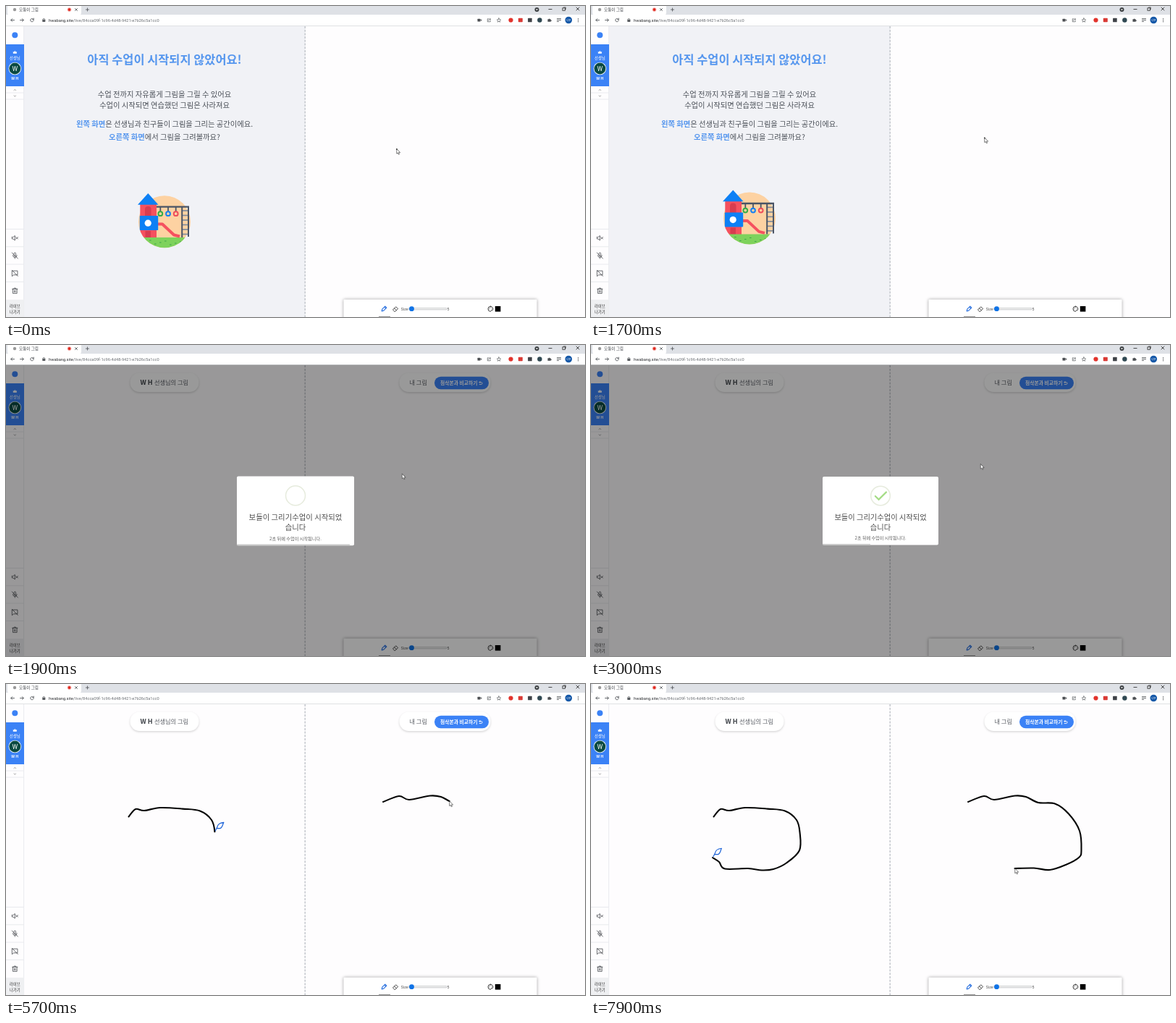
Animation of 800x430 px, one loop 8000 ms. Source, as an HTML page with a canvas:

```html
<!DOCTYPE html>
<html lang="ko">
<head>
<meta charset="utf-8">
<title>모퉁이 그림</title>
<style>
html, body { margin: 0; width: 100%; height: 100%; overflow: hidden; background: #fff; }
canvas { display: block; width: 800px; height: 430px; }
</style>
</head>
<body>
<canvas id="stage"></canvas>
<script>
const W = 800, H = 430, LOOP = 8000, STEP = 100;
const KR = '"Noto Sans CJK KR", "Noto Sans KR", sans-serif';
const LATIN = 'Roboto, sans-serif';
const BLUE = '#3b82f6', SKY = '#5596ee', INK = '#4b5058', LINE = '#e4e6ea';
const RED = '#f5515f', STEEL = '#4a5566', GREY = '#5a5d61';
const TEACHER = 'W H', LESSON = '보들이';
const SWITCH = 1800, OPEN = 1726, CLOSE = 3763, TIMER = 1825;

const canvas = document.getElementById('stage');
const c = canvas.getContext('2d');
const dpr = window.devicePixelRatio || 1;
canvas.width = W * dpr;
canvas.height = H * dpr;

const clamp = v => Math.max(0, Math.min(1, v));
const mix = (a, b, f) => a + (b - a) * f;
const repeat = (n, fn) => { for (let i = 0; i < n; i++) fn(i); };

// ---------- drawing helpers ----------
function rect(x, y, w, h, fill, r = 0) {
  c.fillStyle = fill;
  c.beginPath();
  c.roundRect(x, y, w, h, r);
  c.fill();
}
function disc(x, y, r, fill) {
  c.fillStyle = fill;
  c.beginPath();
  c.arc(x, y, r, 0, 7);
  c.fill();
}
function ring(x, y, r, color, lw) {
  c.strokeStyle = color;
  c.lineWidth = lw;
  c.beginPath();
  c.arc(x, y, r, 0, 7);
  c.stroke();
}
function line(color, lw, ...p) {
  c.strokeStyle = color;
  c.lineWidth = lw;
  c.beginPath();
  for (let i = 0; i < p.length; i += 2) c.lineTo(p[i], p[i + 1]);
  c.stroke();
}
function poly(fill, ...p) {
  c.fillStyle = fill;
  c.beginPath();
  for (let i = 0; i < p.length; i += 2) c.lineTo(p[i], p[i + 1]);
  c.fill();
}
// y is the optical middle of the line
function text(s, x, y, size, color, { weight = 400, align = 'left', font = KR } = {}) {
  c.font = `${weight} ${size}px ${font}`;
  c.textAlign = align;
  c.fillStyle = color;
  c.fillText(s, x, y + size * 0.36);
  return c.measureText(s).width;
}
const centered = (s, x, y, size, color, weight) => text(s, x, y, size, color, { weight, align: 'center' });
// blue lead-in followed by plain words
function labelled(lead, rest, x, y) {
  const w = text(lead, x, y, 10.3, SKY, { weight: 700 });
  text(rest, x + w, y, 10.3, INK);
}
function shadowBox(x, y, w, h, r, color, blur, dy) {
  c.save();
  c.shadowColor = color;
  c.shadowBlur = blur * dpr;
  c.shadowOffsetY = dy * dpr;
  rect(x, y, w, h, '#fff', r);
  c.restore();
}

// icons on a 24-unit grid
const ICONS = {
  mute: 'M2 9v6h4l6 5V4L6 9zM16 9l6 6M22 9l-6 6',
  mic: 'M9 5a3 3 0 0 1 6 0v6a3 3 0 0 1-6 0zM5 11a7 7 0 0 0 14 0M12 18v4M2 2l20 20',
  chat: 'M3 4h18v14H8l-5 4zM2 2l20 20',
  trash: 'M3 6h18M5 6v15h14V6M9 6V3h6v3M10 11v6M14 11v6',
  pencil: 'M2 22l2-8L16 2l6 6L10 20zM13 5l6 6',
  eraser: 'M8 21l-6-6L14 3l8 8-10 10zM8 9l8 8',
  palette: 'M12 2a10 10 0 1 0 0 20c3 0 1-5 4-5h4c4-5 0-15-8-15zM7 13h.1M8 8h.1M13 6h.1M17 10h.1',
  undo: 'M9 3L4 8l5 5M4 8h10a6 6 0 0 1 0 12H5',
  reload: 'M20 8A9 9 0 1 0 21 13M21 2v7h-7',
  arrow: 'M2 12h19M13 4l8 8-8 8',
  star: 'M12 2l3 7 7 1-5 5 1 7-6-4-6 4 1-7-5-5 7-1z',
  share: 'M10 5H3v16h16v-6M8 15c1-6 5-8 12-8M16 3l5 4-5 4',
  crown: 'M2 19V7l5 4 5-8 5 8 5-4v12z',
  puzzle: 'M3 8h6a3 3 0 1 1 6 0h5v5a3 3 0 1 1 0 5v4H3z',
  cross: 'M4 4l16 16M20 4L4 20',
  plus: 'M12 3v18M3 12h18',
  up: 'M5 15l7-6 7 6',
  down: 'M5 9l7 6 7-6',
  quill: 'M1 23L6 13C7 6 14 2 23 1 20 6 20 15 13 17H5',
  pointer: 'M1 1v17l4-3 3 6 3-1-3-6h5z'
};
function icon(name, x, y, size, color, lw = 0.8, fill = '') {
  const k = size / 24, path = new Path2D(ICONS[name]);
  c.save();
  c.translate(x - size / 2, y - size / 2);
  c.scale(k, k);
  c.lineJoin = c.lineCap = 'round';
  c.strokeStyle = color;
  c.fillStyle = fill;
  c.lineWidth = lw / k;
  if (fill) c.fill(path);
  if (lw) c.stroke(path);
  c.restore();
}

// ---------- motion ----------
// keys: [time, x, y], linear between neighbours
function at(keys, t) {
  const i = keys.findIndex(k => k[0] >= t);
  if (i < 1) return keys.at(i).slice(1);
  const a = keys[i - 1], b = keys[i], f = (t - a[0]) / (b[0] - a[0]);
  return [mix(a[1], b[1], f), mix(a[2], b[2], f)];
}
// smooth curve through key points, measured so a pen can run along it
function penStroke(pts, from, to, power) {
  const p = i => pts[Math.max(0, Math.min(pts.length - 1, i))];
  let d = `M${pts[0]}`;
  for (let i = 0; i < pts.length - 1; i++) {
    const ctrl = (k, s) => p(k).map((v, j) => v + s * (p(k + 1)[j] - p(k - 1)[j]) / 6);
    d += `C${ctrl(i, 1)} ${ctrl(i + 1, -1)} ${p(i + 1)}`;
  }
  const el = document.createElementNS('http://www.w3.org/2000/svg', 'path');
  el.setAttribute('d', d);
  const path = new Path2D(d), total = el.getTotalLength();
  const reach = t => total * (1 - (1 - clamp((t - from) / (to - from))) ** power);
  return {
    tip(t) {
      const { x, y } = el.getPointAtLength(reach(t));
      return [x, y];
    },
    draw(t) {
      if (t < from) return false;
      c.save();
      c.strokeStyle = '#050505';
      c.lineWidth = 2.1;
      c.lineJoin = 'round';
      c.setLineDash([reach(t) + 0.1, total * 2]);
      c.lineCap = 'round';
      c.stroke(path);
      c.restore();
      return true;
    }
  };
}
const teacherPen = penStroke([[169.5, 183.5], [179, 173], [191, 175], [213, 171], [244, 172.6],
  [268, 175.5], [284, 188], [288.5, 205], [288, 230], [270, 247.5], [252, 256], [236, 257.5],
  [217, 255], [185, 255.5], [177, 246], [168, 240]], 4480, 7900, 1.42);
const studentPen = penStroke([[521, 163], [543, 155], [557, 160], [586, 154.5], [601, 156],
  [618, 164], [641, 165.5], [660, 179.5], [675, 203], [677.5, 230], [674, 240], [656, 250],
  [634, 257], [612, 254.5], [585.5, 255]], 4700, 7900, 1);
const wander = [[0, 539.5, 197.5], [900, 542, 195.5], [1700, 543.5, 182], [1900, 547, 178],
  [2700, 550, 170], [3000, 538, 164.5], [3900, 524.5, 159], [4700, 521, 163]];

// ---------- parts of the picture ----------
function browser() {
  rect(0, 0, W, 12.5, '#dee1e6');
  rect(2, -4, 102, 17, '#fff', 4);
  rect(0, 12, W, 15.5, '#fff');
  line('#d9dbde', 0.8, 0, 27.5, W, 27.5);
  disc(12, 5, 2.2, '#9a9a9a');
  text('모퉁이 그림', 18, 5.2, 5.6, '#45484d');
  ring(87.5, 5, 2.5, '#f2a09c', 0.8);
  disc(87.5, 5, 2, '#e0291f');
  icon('cross', 97, 5, 4.6, '#4a4d51');
  icon('plus', 112.5, 5, 5.5, '#4a4d51');
  disc(733.5, 5, 3, '#3c4043');
  poly('#fff', 732, 4.3, 735, 4.3, 733.5, 6.2);
  line('#222', 0.8, 749.5, 4.5, 754.5, 4.5);
  c.strokeRect(769, 2.8, 3.4, 3.4);
  line('#222', 0.6, 770.2, 1.8, 773.4, 1.8, 773.4, 5);
  icon('cross', 790, 4, 6, '#222');

  c.save();
  c.scale(-1, 1);
  icon('arrow', -9, 19.5, 6, GREY, 0.9);
  c.restore();
  icon('arrow', 22, 19.5, 6, GREY, 0.9);
  icon('reload', 36, 19.5, 6, GREY, 0.9);
  rect(50.3, 18.8, 4, 3.2, GREY, 0.5);
  ring(52.3, 18.6, 1.3, GREY, 0.7);
  const w = text('hwabang.site', 59, 19.7, 5.7, '#2a2c2f', { font: LATIN });
  text('/live/84cca09f-1c96-4d48-9421-e7b26c5a1cc0', 59 + w, 19.7, 5.7, '#6a6e73', { font: LATIN });

  rect(651.5, 17.7, 4, 3.8, '#4a4d51', 0.5);
  poly('#4a4d51', 655.5, 19.6, 657.2, 18.2, 657.2, 21);
  icon('share', 667.5, 19.5, 6, GREY, 0.7);
  icon('star', 681, 19.5, 6.5, GREY, 0.7);
  const slot = i => 697.5 + 13.3 * i;
  disc(slot(0), 19.5, 3.1, '#e2332c');
  rect(slot(1) - 3, 16.7, 6, 5.6, '#d93a35', 0.8);
  rect(slot(2) - 3, 16.7, 5.6, 5.6, '#3f4247', 0.6);
  disc(slot(3), 19.5, 3.2, '#2f4852');
  icon('puzzle', slot(4), 19.3, 6, GREY, 0, '#4a4d51');
  repeat(3, i => line('#4a4d51', 0.8, 761, 17.5 + 2 * i, i < 2 ? 767 : 764, 17.5 + 2 * i));
  disc(slot(6), 19.5, 4.8, '#1558a8');
  centered('나무', slot(6), 19.5, 3.6, '#fff');
  repeat(3, i => disc(slot(7), 17.3 + 2.2 * i, 0.65, '#4a4d51'));
}

function sidebar() {
  const mid = 12.3;
  rect(0, 28, 24.5, 402, '#fefdfe');
  line(LINE, 0.8, 24.6, 28, 24.6, H);
  disc(mid, 40.2, 4, BLUE);
  rect(0, 53, 25, 58, BLUE);
  icon('crown', mid, 64, 6, '#fff', 0, '#fff');
  centered('선생님', mid, 72.3, 5.5, '#fff');
  disc(mid, 86.5, 8.8, '#eef4f3');
  disc(mid, 86.5, 7.9, '#0a4a42');
  text(TEACHER[0], mid, 86.5, 8.6, '#fff', { align: 'center', font: LATIN });
  centered(TEACHER, mid, 100, 5.2, '#fff', 700);
  icon('up', mid, 116, 4.5, '#777', 0.7);
  icon('down', mid, 124.5, 4.5, '#777', 0.7);
  repeat(2, i => line(LINE, 0.8, 0, 120 + 9 * i, 24.5, 120 + 9 * i));
  ['mute', 'mic', 'chat', 'trash'].forEach((name, i) => {
    const y = 308.5 + 24.3 * i;
    line(LINE, 0.8, 0, y, 24.5, y);
    icon(name, mid, y + 12.3, 9.7, '#44474c');
  });
  rect(0, 406, 24.5, 24, '#eff0f2');
  centered('라이브', mid, 415, 5.4, '#333');
  centered('나가기', mid, 423, 5.4, '#333');
}

function playground(dy) {
  c.save();
  c.translate(0, dy);

  // everything near the ground stays inside the round badge
  c.save();
  c.beginPath();
  c.arc(219, 298.2, 36, 0, 7);
  c.clip();
  rect(180, 260, 80, 80, '#fdd2a2');
  rect(185.3, 309, 22.7, 12, RED);
  rect(192.5, 311, 7.5, 10, '#d83d50');
  rect(180, 320, 80, 20, '#7ed25c');
  repeat(7, i => rect(198 + 7 * i, 323.5 + i * 5 % 7, 2.6, 1, '#3fa548'));
  c.restore();

  repeat(6, i => line('#7f8c9c', 1.7, 243, 283 + 6.5 * i, 252, 283 + 6.5 * i));
  line(STEEL, 2.3, 207, 277.6, 253, 277.6);
  line(STEEL, 2, 243.2, 277, 243.2, 320);
  line(STEEL, 2, 252, 277, 252, 319);
  ['#35ad46', '#1580f2', '#ef4d5c'].forEach((color, i) => {
    const x = 213.3 + 10.7 * i;
    line(STEEL, 1.8, x, 278, x, 284);
    ring(x, 287.2, 2.9, color, 2);
  });

  rect(185.3, 274, 22.7, 17, RED);
  rect(192, 277, 8.5, 14, '#d83d50', [4, 4, 0, 0]);
  poly('#0d80f5', 182, 274.8, 196.3, 259, 210.5, 274.8);
  c.lineJoin = 'round';
  line(RED, 4, 209, 301.5, 216, 301.5, 232, 316.5, 240, 318.5);
  c.lineJoin = 'miter';
  rect(184.8, 290, 25.4, 20, '#0d80f5', 0.8);
  disc(196.2, 300.2, 4.6, '#fff');
  c.restore();
}

function divider() {
  c.setLineDash([3, 1.7]);
  line('#c3c7cc', 1.5, 413.2, 28, 413.2, H);
  c.setLineDash([]);
}

function waiting(t) {
  rect(24.8, 28, 388.5, 402, '#f1f2f6');
  divider();
  centered('아직 수업이 시작되지 않았어요!', 219, 74, 16.4, SKY, 700);
  centered('수업 전까지 자유롭게 그림을 그릴 수 있어요', 219, 122.3, 10.3, INK);
  centered('수업이 시작되면 연습했던 그림은 사라져요', 219, 137.3, 10.3, INK);
  labelled('왼쪽 화면', '은 선생님과 친구들이 그림을 그리는 공간이에요.', 97, 163.5);
  labelled('오른쪽 화면', '에서 그림을 그려볼까요?', 142, 181.3);
  playground(1.3 + 6.5 * Math.sin(t * Math.PI / 1000 - 0.2));
}

function pill(x, w) {
  shadowBox(x, 38.5, w, 26.5, 13, 'rgba(0,0,0,.17)', 3, 1.2);
}

function lesson(t) {
  divider();
  pill(171.5, 95);
  text(TEACHER, 185.5, 52.2, 9, '#3c4046', { weight: 700 });
  text('선생님의 그림', 205, 52.5, 8.2, '#5a5e65');
  pill(543.5, 126);
  text('내 그림', 557.5, 52, 8.2, '#5a5e65');
  rect(592, 43.7, 75, 17.6, BLUE, 8.8);
  text('첨삭본과 비교하기', 600, 52.3, 6.8, '#fff', { weight: 700 });
  icon('undo', 656, 52.5, 6, '#fff', 0.9);
  studentPen.draw(t);
  if (teacherPen.draw(t)) {
    const [x, y] = teacherPen.tip(t);
    icon('quill', x + 6.7, y - 7, 12.5, '#1d63d8', 1.2);
  }
}

function tools() {
  shadowBox(466.5, 405.8, 267, 30, 1, 'rgba(0,0,0,.38)', 4, 0);
  icon('pencil', 522.5, 418.5, 8, '#2f74e0', 1.2);
  icon('eraser', 538, 419, 8.5, '#333', 0.9);
  text('Size', 545.8, 418.8, 5.2, '#555', { font: LATIN });
  rect(556, 417, 53.5, 3.2, '#b9bbbe', 1.6);
  rect(556.6, 417.6, 52.3, 2, '#f1f1f1', 1);
  disc(560.5, 418.7, 3.4, '#0f73e6');
  text('5', 609.5, 418.8, 5.2, '#555', { font: LATIN });
  icon('palette', 669.5, 418.8, 8.5, '#333', 0.9);
  rect(675.8, 415, 7.6, 7.6, '#000');
  rect(515, 429.2, 16, 0.8, '#777');
}

function popup(t) {
  const out = clamp((t - CLOSE) / 150);
  if (t < OPEN || out === 1) return;
  const shade = 0.4 * Math.min(clamp((t - OPEN) / 100), clamp(1 - (t - CLOSE) / 100));
  rect(0, 27.5, W, H - 27.5, `rgba(0,0,0,${shade})`);

  // springs past full size, then settles
  const age = (t - OPEN) / 300;
  const grow = age < 0.45 ? mix(0.7, 1.05, age / 0.45)
    : age < 0.8 ? mix(1.05, 0.95, (age - 0.45) / 0.35)
    : mix(0.95, 1, clamp((age - 0.8) / 0.2));
  const scale = grow * (1 - out / 2);
  c.save();
  c.globalAlpha = 1 - out;
  c.translate(400, 229.2);
  c.scale(scale, scale);
  c.translate(-400, -229.2);
  rect(320, 182, 160, 94.6, '#fff', 2);
  ring(400, 208.5, 13.3, '#e6ebdd', 1.5);

  const check = clamp((t - OPEN - 350) / 350);
  if (check > 0) {
    c.lineCap = 'round';
    c.setLineDash([22 * check, 60]);
    line('#a5dc86', 2.2, 392.8, 209, 397.6, 213.6, 408, 203.4);
    c.setLineDash([]);
    c.lineCap = 'butt';
  }
  centered(LESSON + ' 그리기수업이 시작되었', 400, 238.3, 10.25, '#4d4d4d', 500);
  centered('습니다', 400, 252.3, 10.25, '#4d4d4d', 500);
  centered('2초 뒤에 수업이 시작됩니다.', 400, 267.2, 6.1, '#5c5c5c');
  rect(320, 274.9, 160 * clamp(1 - (t - TIMER) / 2000), 1.7, '#c9c9c9');
  c.restore();
}

function pointer(t) {
  const [x, y] = t < 4700 ? at(wander, t) : studentPen.tip(t);
  icon('pointer', x + 4.4, y + 4.4, 9, '#444', 0.7, '#fff');
  if (t < SWITCH) disc(x + 0.4, y + 0.5, 1, '#444');
}

function draw(t) {
  c.setTransform(dpr, 0, 0, dpr, 0, 0);
  rect(0, 0, W, H, '#fefdfe');
  t < SWITCH ? waiting(t) : lesson(t);
  sidebar();
  tools();
  browser();
  popup(t);
  pointer(t);
}

const start = performance.now();
function tick(now) {
  const t = Math.max(0, now - start) % LOOP;
  draw(Math.floor(t / STEP) * STEP);
  requestAnimationFrame(tick);
}
draw(0);
requestAnimationFrame(tick);
</script>
</body>
</html>
```
